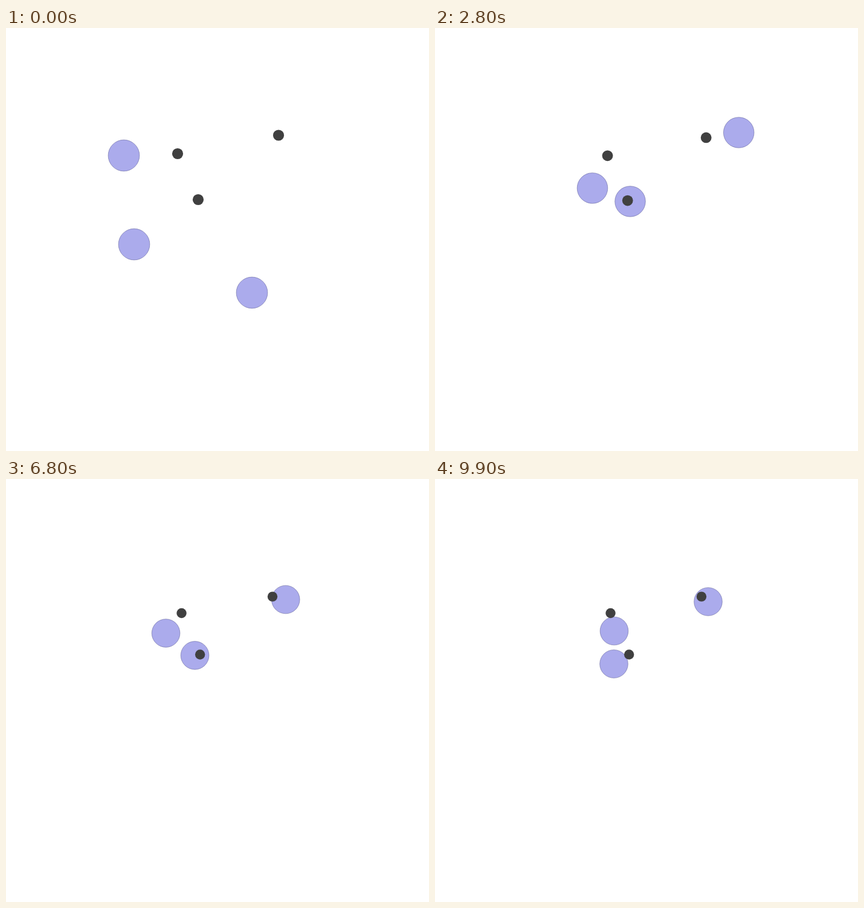
An HTML page for the animation above (10 s loop, 700x700 px).

```html
<!DOCTYPE html>
<html lang="en">
<head>
<meta charset="utf-8">
<title>Agents and landmarks</title>
<style>
  html, body { margin: 0; width: 100%; height: 100%; overflow: hidden; background: #fff; }
  svg { display: block; width: 100vw; height: 100vh; }
  .agent { fill: rgba(89, 89, 217, .5); stroke: rgba(70, 70, 130, .55); stroke-width: .8; }
  .mark { fill: #404040; }
</style>
</head>
<body>
<svg id="stage" viewBox="0 0 700 700"></svg>
<script>
const LOOP = 10000, STEP = 100, MID = 350;

// Each path is a few [ms, x, y] poses, joined by smooth curves.
const paths = [
  [[0, 195, 211], [600, 262, 218], [1300, 284.5, 231], [2400, 240.5, 263],
   [2800, 260.5, 265], [3300, 269, 258], [4000, 281, 251.5], [5000, 276, 246],
   [5600, 291, 246.5], [7100, 261.5, 256], [8000, 284.5, 256], [9000, 267, 252],
   [9900, 296.5, 251.5]],
  [[0, 212, 358], [600, 281, 303], [1300, 309, 281.5], [1800, 313, 300],
   [2800, 323, 287], [4000, 318, 301.5], [4400, 315, 308.5], [5600, 307, 304.5],
   [6600, 312, 292.5], [8000, 314.7, 290], [9400, 302, 310.5], [9900, 296, 306]],
  [[0, 407, 438], [400, 414, 370], [1000, 439, 214], [1300, 456.7, 196],
   [2100, 477, 168], [2800, 502.7, 173], [3100, 511, 155], [3300, 496.5, 161.5],
   [4000, 471, 191.3], [4400, 466.5, 187], [5600, 462.5, 203], [8000, 463.6, 191.5],
   [8400, 474, 184.5], [8900, 492.5, 192.5], [9900, 452, 203]]
];
const marks = [[284, 208], [318, 284], [451, 177.5]];

// Cubic through the keys; turning points stay the extremes.
function sample(keys, t, k) {
  const last = keys.length - 1;
  if (t >= keys[last][0]) return keys[last][k];
  const i = keys.findIndex(key => key[0] > t) - 1;
  const slope = j => (keys[j + 1][k] - keys[j][k]) / (keys[j + 1][0] - keys[j][0]);
  const tangent = j => {
    if (j === 0 || j === last) return 0;
    const a = slope(j - 1), b = slope(j);
    return a * b > 0 ? 2 * a * b / (a + b) : 0;
  };
  const h = keys[i + 1][0] - keys[i][0], u = (t - keys[i][0]) / h, v = 1 - u;
  return v * v * (1 + 2 * u) * keys[i][k] + u * u * (3 - 2 * u) * keys[i + 1][k]
    + h * u * v * (v * tangent(i) - u * tangent(i + 1));
}

const ramp = (t, from, to) => Math.min(1, Math.max(0, (t - from) / (to - from)));

// The view widens twice as the right-hand agent strays outwards.
const zoomAt = t => 1 - .023 * ramp(t, 1500, 1900) - .076 * ramp(t, 2800, 3100);

const stage = document.getElementById("stage");
function addCircle(name) {
  const el = document.createElementNS("http://www.w3.org/2000/svg", "circle");
  el.setAttribute("class", name);
  stage.append(el);
  return el;
}
function place(el, x, y, r) {
  el.setAttribute("cx", x);
  el.setAttribute("cy", y);
  el.setAttribute("r", r);
}

const agents = paths.map(() => addCircle("agent"));
const dots = marks.map(() => addCircle("mark"));

function draw(now) {
  const t = Math.floor((now % LOOP) / STEP) * STEP;
  const zoom = zoomAt(t);
  agents.forEach((el, i) =>
    place(el, sample(paths[i], t, 1), sample(paths[i], t, 2), 25.9 * zoom));
  dots.forEach((el, i) => {
    const [x, y] = marks[i];
    place(el, MID + (x - MID) * zoom, MID + (y - MID) * zoom, 9.1 * zoom);
  });
}

const start = performance.now();
function tick() {
  draw(performance.now() - start);
  requestAnimationFrame(tick);
}
tick();
</script>
</body>
</html>
```
